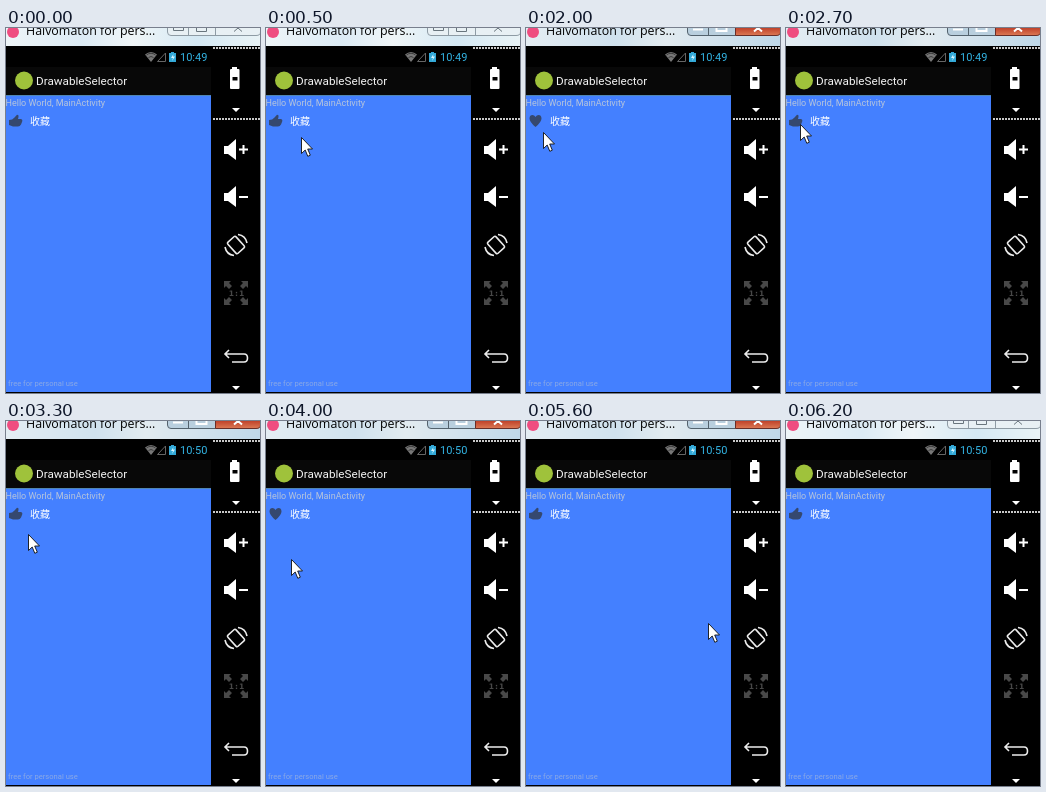
Animation of 254 by 365 pixels, one loop 6.3 s. Source, as an HTML page:

```html
<!DOCTYPE html>
<html lang="en">
<head>
<meta charset="utf-8">
<title>Drawable selector demo</title>
<style>
  html, body { margin: 0; width: 100%; height: 100%; overflow: hidden; background: #000; }
  svg { display: block; width: 254px; height: 365px; }
  text { font-family: Roboto, sans-serif; white-space: pre; }
  .cjk { font-family: "Noto Sans CJK SC", "Noto Sans CJK", "Noto Sans CJK JP", sans-serif; }
  .caption { font-family: "Open Sans", "Noto Sans", sans-serif; }
  .ratio { font-family: "DejaVu Sans", sans-serif; }
</style>
</head>
<body>
<svg viewBox="0 0 254 365" xmlns="http://www.w3.org/2000/svg">
  <defs>
    <linearGradient id="glass">
      <stop offset="0" stop-color="#eef5f8"/>
      <stop offset=".3" stop-color="#dcebf5"/>
      <stop offset=".5" stop-color="#eff5f7"/>
      <stop offset=".75" stop-color="#d5e9f4"/>
      <stop offset="1" stop-color="#e9f3f6"/>
    </linearGradient>
    <linearGradient id="glassActive">
      <stop offset="0" stop-color="#e4edf3"/>
      <stop offset=".35" stop-color="#d0e2ee"/>
      <stop offset=".55" stop-color="#e2ebf0"/>
      <stop offset="1" stop-color="#bfd8e9"/>
    </linearGradient>
    <linearGradient id="closeRed" x2="0" y2="1">
      <stop offset="0" stop-color="#b8331f"/>
      <stop offset="1" stop-color="#dc7a55"/>
    </linearGradient>
    <path id="speaker" d="M218 -4H222L230 -11V10L222 4H218Z"/>
    <path id="corner" d="M-12 -12H-5L-7 -10L-4 -7L-7 -4L-10 -7L-12 -5Z"/>
  </defs>

  <rect width="254" height="365"/>

  <!-- Window title bar -->
  <rect id="titleBar" width="254" height="18" fill="url(#glass)"/>
  <circle cx="7" cy="4" r="6" fill="#ef4d80"/>
  <text class="caption" x="20" y="7" font-size="12.400">Halvomaton for pers...</text>
  <g id="idleButtons" fill="#e8f0f4" stroke="#8e9ba4">
    <path d="M161.500 -2V4Q161.500 7.500 165 7.500H250Q254.500 7.500 254.500 4V-2M182.500 -2V7M209.500 -2V7"/>
    <path d="M167.500 -2V2.500H177.500V-2M190.500 -2V3.500H200.500V-2M228 3.500L232 0L236 3.500" fill="none" stroke="#69757d"/>
  </g>
  <g id="liveButtons" stroke="#53626d">
    <path d="M161.500 -2V4Q161.500 7.500 165 7.500H209.500V-2Z" fill="#b9cfde"/>
    <path d="M209.500 -2V7.500H250Q254.500 7.500 254.500 4V-2Z" fill="url(#closeRed)" stroke="#682e28"/>
    <path d="M182.500 -2V7"/>
    <path d="M167 1.500H177M190.500 -2V3H200.500V-2M228 3.500L232 0L236 3.500" fill="none" stroke="#fff" stroke-width="2"/>
  </g>

  <!-- Status and action bars -->
  <path d="M139 26.500Q145 21.500 151 26.500L145 34Z" fill="#777"/>
  <path d="M140.500 27Q145 23.500 149.500 27M142.500 29.500Q145 27.500 147.500 29.500" fill="none" stroke="#222" stroke-width=".7"/>
  <path d="M151.500 33.500H159.500V25Z" fill="none" stroke="#666"/>
  <path d="M165 24H168V25H170V34H163V25H165Z" fill="#33a9d8"/>
  <path d="M167.500 26L165 30H167L166 33L169 28.500H167Z" fill="#d8f5ff"/>
  <text id="clock" x="174" y="33" font-size="11" fill="#33b5e5"></text>
  <rect y="39" width="205" height="28" fill="#080808"/>
  <circle cx="18" cy="52.500" r="9" fill="#9fc23b"/>
  <text x="30" y="56.500" font-size="11.700" fill="#f3f3f3">DrawableSelector</text>

  <!-- App content -->
  <rect y="67" width="205" height="297" fill="#4480ff"/>
  <rect y="67" width="205" height="1" fill="#4f86b4"/>
  <text x="-.5" y="78" font-size="9" fill="#b7c4dc">Hello World, MainActivity</text>
  <path id="thumb" fill="#35486f" d="M3 92Q6.500 92 8.500 89.500L11 86.700Q13 86.500 12.500 89L12 91H15Q17 91.500 16 94L15 96.500Q14 98.500 12 98.500H7L3 97Z"/>
  <path id="heart" fill="#35486f" d="M9.500 99Q3.500 94 3.500 90.500C3.500 86 8 86 9.500 89C11 86 15.500 86 15.500 90.500Q15.500 94 9.500 99Z"/>
  <text class="cjk" x="24" y="96.500" font-size="10" fill="#fff">收藏</text>
  <text x="2" y="358" font-size="7.600" fill="#8aa8e6">free for personal use</text>

  <!-- Emulator toolbar -->
  <path d="M207 20H254M207 91H254" stroke="#c9c9c9" stroke-width="2" stroke-dasharray="2 1"/>
  <g fill="#fff">
    <path d="M226 39H231V41H232.500Q233.500 41 233.500 42V60Q233.500 61 232.500 61H225Q224 61 224 60V42Q224 41 225 41H226Z"/>
    <path d="M226.500 49H231.500V52.500H226.500Z" fill="#000"/>
    <path d="M226 80H234L230 84ZM226 358H234L230 362Z"/>
    <use href="#speaker" y="122"/>
    <use href="#speaker" y="169"/>
    <path d="M233 120.500H242V122.500H233ZM236.500 117H238.500V126H236.500ZM233 168H242V170H233Z"/>
  </g>
  <g fill="none" stroke="#ececec" stroke-width="1.600">
    <rect x="224.500" y="209.500" width="11" height="15" rx="1.500" transform="rotate(-42 230 217)"/>
    <path d="M232 206.500Q239.500 207.500 241 215M228 227.500Q220.500 226.500 219 219"/>
    <path d="M223 322L219 326L223 330M219 326H238Q241.500 326 241.500 330T238 334H226"/>
  </g>
  <g fill="#484848" transform="translate(230 265)">
    <use href="#corner"/>
    <use href="#corner" transform="scale(-1 1)"/>
    <use href="#corner" transform="scale(1 -1)"/>
    <use href="#corner" transform="scale(-1)"/>
    <text class="ratio" x="1" y="3" font-size="7.500" font-weight="700" text-anchor="middle" letter-spacing="1">1:1</text>
  </g>

  <path id="pointer" d="M.5 .5V16.500L4.200 13L6.800 19.300L9.300 18.200L6.700 12H11.500Z" fill="#fff" stroke="#111" stroke-width=".9"/>
</svg>
<script>
const LOOP = 6300, STEP = 100;
const part = id => document.getElementById(id);
const show = (id, on) => part(id).setAttribute("visibility", on ? "visible" : "hidden");
const within = (t, from, to) => t >= from && t < to;

// Each stroke starts at a time and advances one point per step, then rests.
const strokes = [
  [100, "233,39 190,62 130,85 75,103 35,109 14,108 7,103 6,95 7,88 7,88 11,90"],
  [1300, "20,105 40,142 60,173"],
  [1700, "66,165 48,138 29,117 17,104 13,99 11,96 10,94 10,90"],
  [2700, "14,96 30,130 44,158 46,165 38,145 28,125 22,113 14,100 10,93"],
  [3800, "12,97 18,118 25,138 27,143 24,132 19,120 15,110 12,100 10,93 9,90"],
  [5000, "12,97 30,135 60,185 100,222 135,234 163,222 182,202 230,158"]
].map(([start, points]) => ({ start, points: points.split(" ") }));

function pointerAt(t) {
  const stroke = strokes.filter(s => s.start <= t).pop() || strokes[0];
  const index = Math.max(0, Math.floor((t - stroke.start) / STEP));
  return stroke.points[Math.min(index, stroke.points.length - 1)];
}

function draw(t) {
  const active = within(t, 1300, 6200);
  const liked = within(t, 1300, 2700) || within(t, 3800, 5000);
  part("titleBar").setAttribute("fill", active ? "url(#glassActive)" : "url(#glass)");
  show("idleButtons", !active);
  show("liveButtons", active);
  show("heart", liked);
  show("thumb", !liked);
  part("clock").textContent = t < 2900 ? "10:49" : "10:50";
  show("pointer", within(t, 100, 5800));
  part("pointer").setAttribute("transform", `translate(${pointerAt(t)})`);
}

const began = performance.now();
function tick() {
  draw((performance.now() - began) % LOOP);
  requestAnimationFrame(tick);
}
tick();
</script>
</body>
</html>
```
